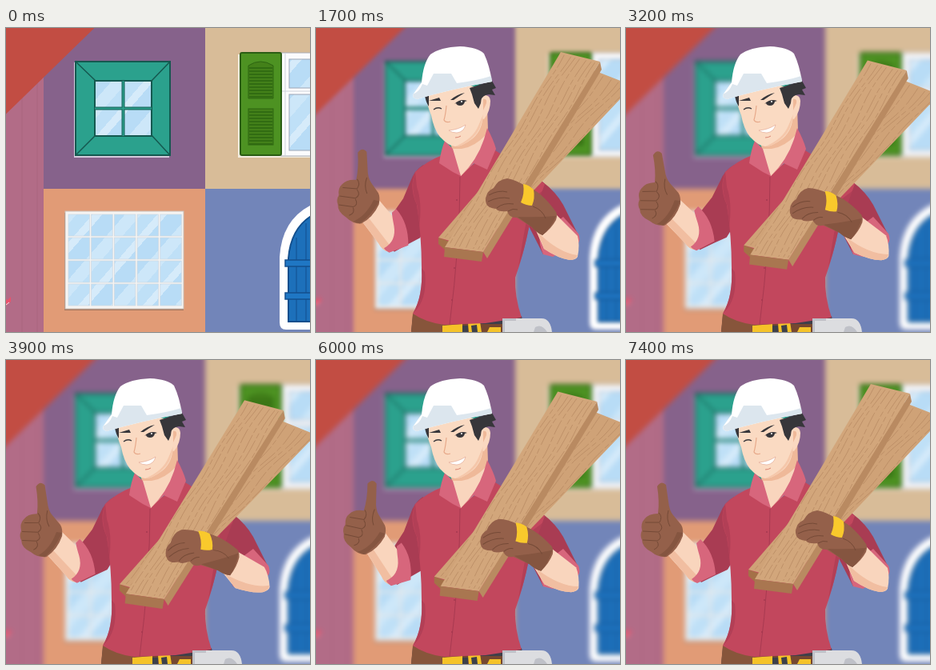
Animation, 380 px wide and 380 px high, one loop 7500 ms. Source, as an HTML page:

```html
<!DOCTYPE html>
<html lang="en">
<head>
<meta charset="utf-8">
<title>Builder with planks</title>
<style>
html, body { margin: 0; width: 100%; height: 100%; overflow: hidden; }
#stage { position: relative; width: 380px; height: 380px; overflow: hidden; background: #b26c87; }
svg { position: absolute; display: block; }
#wall { left: -20px; top: -20px; }
#man { left: 0; top: 0; }
</style>
</head>
<body>
<div id="stage">
<svg id="wall" width="420" height="420" viewBox="-20 -20 420 420">
  <defs>
    <linearGradient id="glass" gradientUnits="userSpaceOnUse" x1="0" y1="0" x2="46" y2="40" spreadMethod="repeat">
      <stop offset="0" stop-color="#b8dcf6"/><stop offset=".35" stop-color="#b8dcf6"/>
      <stop offset=".35" stop-color="#cde7f9"/><stop offset=".6" stop-color="#cde7f9"/>
      <stop offset=".6" stop-color="#bfe0f7"/><stop offset=".85" stop-color="#bfe0f7"/>
      <stop offset=".85" stop-color="#d6ebfa"/><stop offset="1" stop-color="#d6ebfa"/>
    </linearGradient>
  </defs>
  <g id="scene"></g>
</svg>
<svg id="man" width="380" height="380" viewBox="0 0 380 380">
  <g id="figure">
    <g id="upperArm">
      <path fill="#a93c53" d="M135 171 Q123 178 118 191 L108 212 95 229 90 273 94 278 112 269 127 262 140 240 140 180Z"/>
      <g id="foreArm">
        <path fill="#f9d5bd" d="M69 213 L99 243 103 264 88 278 Q80 277 75 269 L49 240Z"/>
        <path fill="#f1bea1" d="M55 246 L49 240 56 234 91 272 87 278 Q80 277 75 269Z"/>
        <path fill="#94604a" d="M39 158 Q44 150 50 156 L53 177 Q54 188 59 194 L69 206 Q72 211 71 220 Q65 237 51 246 Q40 247 32 240 Q20 234 20 225 Q17 219 20 213 Q18 204 23 199 Q28 192 40 192 Q42 177 39 158Z"/>
        <path fill="#855540" d="M71 216 Q62 236 49 246 L41 244 Q56 236 64 215Z"/>
        <path class="crease" d="M41 191 Q46 196 42 203 L24 203 M42 204 Q48 210 41 215 L21 214 M41 216 Q46 223 39 226 L21 225 M39 227 Q43 233 35 237 M53 188 Q50 199 55 208"/>
        <path fill="#d7667c" d="M93 224 Q110 240 112 268 L89 279 Q84 277 82 274 Q97 264 92 245 Q89 235 88 229Z"/>
      </g>
    </g>

    <path fill="#3d3f49" d="M121 360 H257 L260 380 H119Z"/>
    <path fill="#87553b" d="M121 357 L160 370 V380 H119Z"/>
    <path fill="#754730" d="M160 370 H235 V380 H160Z"/>
    <path fill="#f5c328" d="M158 372 L183 370 V380 H158Z M190 369 L205 367 207 380 H191Z M217 374 H231 V380 H214Z"/>
    <path fill="#3d3f49" d="M183 372 H190 V380 H183Z M194 372 L201 371 202 380 H195Z"/>

    <path fill="#a93c53" d="M258 178 L283 192 Q300 205 309 221 L328 259 320 270 284 283 262 240Z"/>
    <path fill="#c2475d" d="M160 158 Q137 167 124 180 Q116 199 126 221 Q132 260 132 300 Q134 335 121 357 Q137 368 160 371 L212 369 257 362 Q248 335 249 312 Q259 285 266 250 L286 195 Q266 179 224 153 L182 180Z"/>
    <path fill="#ad3d54" d="M124 180 Q117 200 127 223 L129 248 Q133 218 126 199Z M268 215 L284 203 266 250 Q260 280 253 298 Q260 255 268 215Z M132 300 Q134 335 121 357 Q140 340 136 305Z" opacity=".75"/>
    <path fill="none" stroke="#a83a51" d="M180 186 Q180 270 167 371"/>
    <g fill="#a43950"><circle cx="176" cy="215" r="1"/><circle cx="175" cy="250" r="1"/><circle cx="173" cy="300" r="1"/><circle cx="170" cy="340" r="1"/></g>

    <path fill="#efb999" d="M168 142 L172 162 181 185 203 163 215 128 214 98 204 100Z"/>
    <path fill="#f9d5bd" d="M170 151 L182 151 Q198 149 214 132 L204 160 181 185 172 165Z"/>
    <path fill="#d7667c" d="M161 141 L171 151 181 185 171 180 154 169 Q156 153 161 141Z M214 125 Q222 140 225 151 L214 177 197 169 181 185 Q201 166 210 139Z"/>
    <path fill="#fad8c0" d="M203 86 Q217 80 218 91 Q218 104 210 114 L204 112Z"/>
    <path fill="#efb999" d="M209 89 Q214 88 213 94 L209 103Z"/>
    <path fill="#fadac2" d="M137 82 Q139 98 144 109 Q147 126 155 136 Q166 148 174 148 Q183 148 196 138 Q208 128 209 108 L206 76 190 71Z"/>
    <path fill="#f5c7aa" d="M209 108 Q207 128 195 138 Q183 148 174 148 Q196 139 203 122Z"/>
    <path fill="#37363a" d="M192 75 L220 66 225 75 220 77 224 84 216 83 212 84 Q206 86 206 94 L203 101 198 94 195 83Z M136 84 L141 85 141 98 Q137 92 136 84Z"/>
    <g fill="#37363a">
      <path d="M141 91 L154 87 156 91 149 91Z M168 90 Q176 83 186 81 Q179 85 172 90Z"/>
      <path d="M173 95 Q180 88 189 91 L186 92 Q185 97 180 97 Q176 97 175 94Z"/>
    </g>
    <circle cx="182" cy="92" r="1" fill="#fff"/>
    <path fill="none" stroke="#37363a" stroke-width="1.300" d="M147 102 Q152 98 157 101"/>
    <path fill="none" stroke="#e7a98a" stroke-width="1.200" d="M163 97 Q162 108 160 115 Q162 119 168 117"/>
    <path fill="#fff" stroke="#dfa18e" stroke-width=".6" d="M166 128 Q178 127 187 121 Q185 130 176 131 Q170 131 166 128Z"/>
    <path fill="none" stroke="#d98573" d="M174 137 Q178 137 181 135"/>
    <path fill="#fff" d="M132 68 Q134 44 143 33 Q155 24 180 23 Q202 24 210 32 Q217 47 220 67 Q170 76 126 89 Q119 87 122 82Z"/>
    <path fill="#dce6ee" d="M122 82 Q129 80 133 70 L139 72 147 57 H169 L176 69 Q200 66 219 60 L220 67 Q170 76 126 89 Q119 87 122 82Z"/>

    <path fill="#d7667c" d="M309 236 L328 257 Q331 264 328 269 L296 286 284 283 Q278 269 280 258Z"/>
    <g id="planks"></g>
    <path fill="#dcdde0" d="M233 363 H282 Q293 363 295 380 H233Z"/>
    <path fill="#bfc1c8" d="M233 363 H250 V366 H236 V380 H233Z M274 374 Q282 369 289 380 H272Z"/>
    <g id="holdArm">
      <path fill="#f9d5bd" d="M299 232 L327 260 Q330 271 327 286 Q325 290 317 290 Q303 288 285 276 L274 251Z"/>
      <path fill="#f1bea1" d="M277 255 Q303 281 327 284 Q325 290 317 290 Q303 288 285 276Z"/>
      <path fill="#94604a" d="M213 210 Q214 204 222 200 Q228 189 239 188 Q250 190 261 197 Q282 204 300 230 Q302 234 300 240 Q294 251 283 259 Q276 256 270 249 Q259 242 251 237 Q242 238 239 229 Q228 230 225 226 Q215 225 213 220 Q211 214 213 210Z"/>
      <path fill="#855540" d="M252 236 Q275 237 300 235 Q293 251 283 259 Q276 256 270 249Z"/>
      <path class="crease" d="M216 209 Q228 202 239 205 M215 217 Q229 210 242 213 M226 225 Q234 218 247 220 M240 229 Q246 225 252 227 M271 223 Q283 227 287 238"/>
      <path fill="#f9c92c" d="M259 195 Q266 196 272 202 Q274 213 270 222 Q263 222 256 218 Q261 207 259 195Z"/>
    </g>
  </g>
</svg>
</div>
<script>
const $ = id => document.getElementById(id);
const LOOP = 7500, STEP = 100;

const rect = (x, y, w, h, fill, more = '') =>
  `<rect x="${x}" y="${y}" width="${w}" height="${h}" fill="${fill}" ${more}/>`;
const path = (d, fill, more = '') => `<path d="${d}" fill="${fill}" ${more}/>`;
const line = (d, color, width = 1, more = '') =>
  path(d, 'none', `stroke="${color}" stroke-width="${width}" ${more}`);
const glass = (x, y, w, h, more) => rect(x, y, w, h, 'url(#glass)', more);
const times = (n, fn) => Array.from({ length: n }, (_, i) => fn(i)).join('');

function walls() {
  return rect(-20, -20, 67, 420, '#b26c87')
    + line('M20 40 V400 M39 30 V400', '#a9647f')
    + rect(47, -20, 202, 221, '#86628b') + rect(249, -20, 151, 221, '#d8bc98')
    + rect(47, 201, 202, 199, '#e19b76') + rect(249, 201, 151, 199, '#7285b9')
    + path('M-20 -20 H131 L-20 127Z', '#c24d43')
    + path('M-4 337 L2 340 6 336 6 342 0 347 -4 347Z', '#e9536c')
    + line('M0 346 L4 343', '#f6dfe6');
}

function tealWindow() {
  return rect(85, 43, 119, 119, '#d3cadb')
    + rect(87, 42, 118, 117, '#2ba18d', 'stroke="#155950" stroke-width="2"')
    + line('M87 42 L112 66 M205 42 L182 66 M87 159 L112 134 M205 159 L182 134', '#155950', 1.5)
    + glass(111, 66, 71, 69, 'stroke="#155950" stroke-width="2"')
    + line('M146.500 66 V135 M111 100.500 H182', '#1a6c61', 4)
    + line('M146.500 66 V135 M111 100.500 H182', '#2ba18d', 1.5);
}

function shutterWindow() {
  const slats = (y, n) => line(times(n, i => `M304 ${y + i * 4} H333`), '#2d6511', 1.6);
  return rect(290, 33, 110, 129, '#f3ecdf')
    + rect(344, 31, 56, 129, '#fbfbfd', 'stroke="#a9adb8"')
    + glass(354, 39, 46, 36, 'stroke="#9da6b5"') + glass(354, 83, 46, 70, 'stroke="#9da6b5"')
    + line('M349 31 V160 M345 79 H400', '#cfd3db')
    + rect(293, 31, 51, 128, '#4d9222', 'rx="2" stroke="#2b5d14" stroke-width="2"')
    + path('M303 88 V47 Q318 37 334 47 V88Z', '#438019', 'stroke="#2d6511"')
    + rect(303, 101, 31, 45, '#438019', 'stroke="#2d6511"')
    + slats(50, 10) + slats(105, 11);
}

function gridWindow() {
  const panes = times(20, i => {
    const x = 78 + i % 5 * 28.7, y = 233 + (i / 5 | 0) * 29;
    return glass(x, y, 26.5, 27, 'stroke="#cbd6e0" stroke-width=".7"');
  });
  return rect(73, 231, 149, 122, '#a7785f') + rect(74, 229, 148, 122, '#f6f4f2', 'stroke="#c9c0ba"') + panes;
}

function archShutter() {
  const band = y => rect(349, y, 51, 8, '#1f77c4', 'stroke="#134f8d" stroke-width="1.500"');
  return path('M350 377 Q342 377 342 368 V286 Q345 238 384 220 H400 V377Z', '#fff')
    + path('M353 367 V288 Q356 250 383 234 H400 V367Z', '#1d70ba', 'stroke="#134f8d" stroke-width="2"')
    + line('M363 262 V366 M375 244 V366', '#16599d', 1.5)
    + band(290) + band(331);
}

// Each plank: top-left, top-right, bottom-right, bottom-left.
function plank(c, fill, lines, seed) {
  const at = (u, v) => [0, 1].map(k => {
    const top = c[0][k] + (c[1][k] - c[0][k]) * v;
    const end = c[3][k] + (c[2][k] - c[3][k]) * v;
    return (top + (end - top) * u).toFixed(1);
  }).join(' ');
  const grain = times(lines, i => {
    const v = (i + .6) / lines;
    let d = '';
    for (let k = 0; k <= 24; k++) {
      const wave = Math.sin(k * .7 + seed + i * .5) * .035 + Math.sin(k * .3 + i * 1.7) * .025;
      d += (k ? 'L' : 'M') + at(.01 + k / 24.5, Math.min(.97, Math.max(.03, v + wave)));
    }
    return line(d, '#b58760', .7, `stroke-dasharray="${18 + i * 5 % 13} ${3 + i % 3} 7 3"`);
  });
  return path('M' + c.map(p => p.join(' ')).join('L') + 'Z', fill) + grain;
}

// The rear plank leans further over and shows on both sides of the front one.
function planks() {
  return path('M153 262 L153 270 162 278 170 268Z', '#a47148')
    + plank([[337, 49], [396, 72], [203, 276], [153, 262]], '#cfa277', 8, 4)
    + path('M355 42 L357 52 285 172 214 288 209 280Z', '#b98a61')
    + plank([[306, 30], [355, 42], [209, 280], [161, 274]], '#d2a67b', 7, 1)
    + path('M161 274 L209 280 207 292 160 286Z', '#a97650');
}

$('scene').innerHTML = walls() + tealWindow() + shutterWindow() + gridWindow() + archShutter();
$('planks').innerHTML = planks();
document.querySelectorAll('.crease').forEach(el => {
  el.setAttribute('fill', 'none');
  el.setAttribute('stroke', '#754a37');
});

const ramp = (t, from, to) => Math.min(1, Math.max(0, (t - from) / (to - from)));
const smooth = p => p * p * (3 - 2 * p);

// Forearm swing: time, degrees.
const SWING = [[0, 0], [900, 1], [1700, 5], [3200, -2], [4800, 3.5], [6000, 9.5], [7400, 0], [7500, -.5]];

function swing(t) {
  let i = 0;
  while (i < SWING.length - 2 && t >= SWING[i + 1][0]) i++;
  const slope = k => {
    const a = SWING[Math.max(0, k - 1)], b = SWING[Math.min(SWING.length - 1, k + 1)];
    return (b[1] - a[1]) / (b[0] - a[0]);
  };
  const [t0, v0] = SWING[i], [t1, v1] = SWING[i + 1];
  const span = t1 - t0, p = (t - t0) / span, q = 1 - p;
  return v0 * (1 - smooth(p)) + v1 * smooth(p)
    + span * p * q * (q * slope(i) - p * slope(i + 1));
}

const move = (id, value) => $(id).setAttribute('transform', value);

function draw(t) {
  const rise = 365 * (1 - ramp(t, 300, 1300)) ** 3;
  const blur = 3.4 * (1 - (1 - ramp(t, 1000, 2300)) ** 2);
  const drop = smooth(ramp(t, 2300, 4100)) - smooth(ramp(t, 5100, 6800));
  const a = swing(t);

  $('wall').style.filter = blur ? `blur(${blur}px)` : 'none';
  move('figure', `translate(0 ${rise})`);
  move('upperArm', `rotate(${-.5 * a} 135 190)`);
  move('foreArm', `rotate(${1.5 * a} 90 268)`);
  move('planks', `translate(${-10 * drop} ${20 * drop}) rotate(${.8 * drop} 230 160)`);
  move('holdArm', `rotate(${-15.7 * drop} 320 275)`);
}

const start = performance.now();
function tick() {
  const t = (performance.now() - start) % LOOP;
  draw(Math.floor(t / STEP) * STEP);
  requestAnimationFrame(tick);
}
tick();
</script>
</body>
</html>
```
